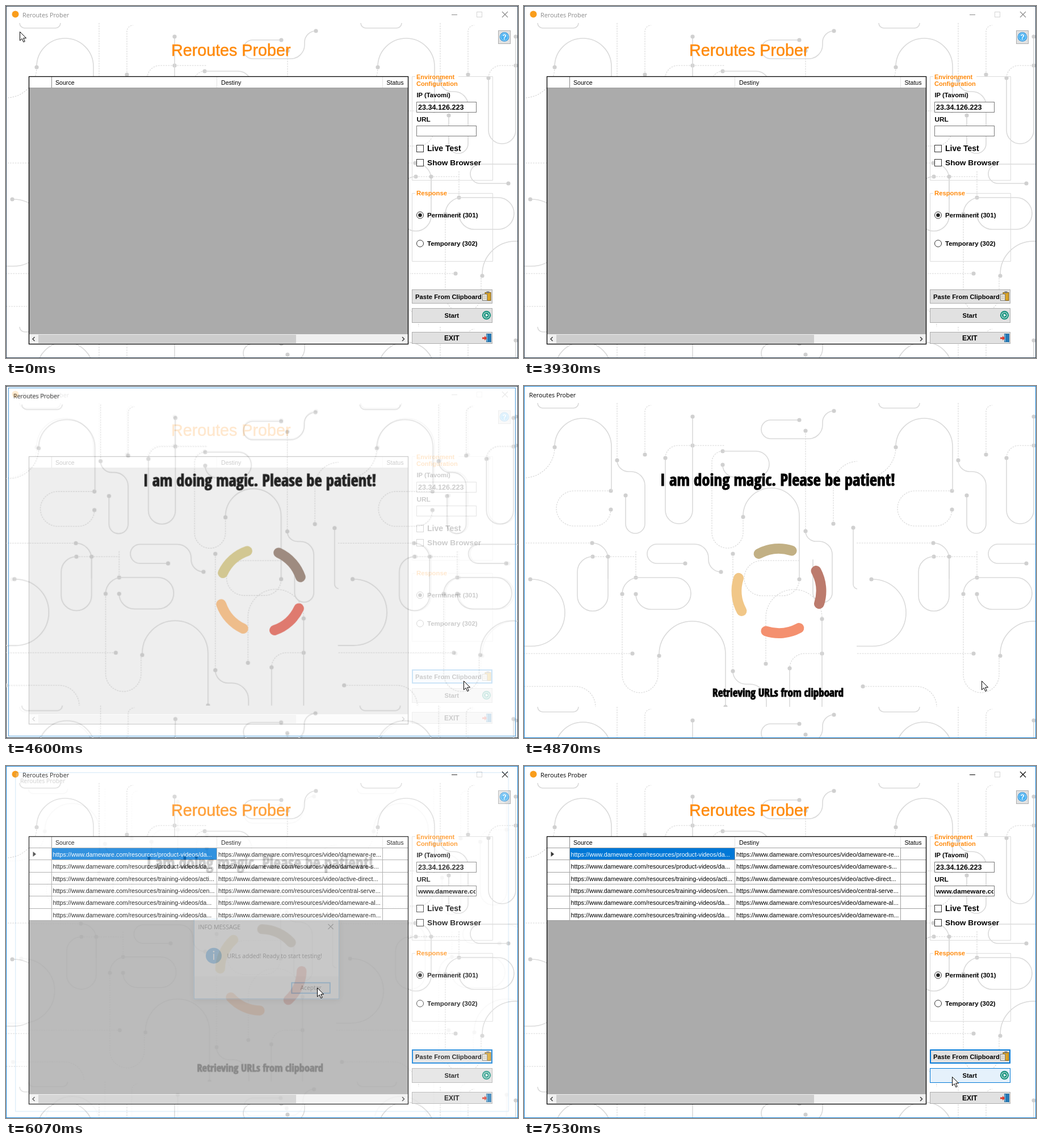
Animation, 902 px wide and 621 px high, one loop 8 s. Source, as an HTML page:

```html
<!DOCTYPE html>
<html lang="en">
<head>
<meta charset="utf-8">
<title>Reroutes Prober</title>
<style>
  html, body { margin: 0; width: 100%; height: 100%; overflow: hidden; background: #fff; }
  svg { display: block; }
  text { font-family: "Liberation Sans", Arial, sans-serif; white-space: pre; }
  .seg { font-family: "Open Sans", "Noto Sans", sans-serif; }
  .b { font-weight: bold; }
  .accent { fill: #ff8a0c; }
  .solid { fill: none; stroke: #dadada; stroke-width: 1.6; }
  .dash { fill: none; stroke: #d6d6d6; stroke-width: 1.1; stroke-dasharray: 2.6 1.8; }
  .dot { fill: #d0d0d0; }
  .loud { font-weight: 900; font-stretch: extra-condensed; stroke: #000; stroke-width: 1; text-anchor: middle; }
</style>
</head>
<body>
<svg id="stage" width="902" height="621" viewBox="0 0 902 621" xmlns="http://www.w3.org/2000/svg"></svg>
<script>
const W = 902, H = 621, LOOP = 8000, FRAME = 1000 / 15;
const NAME = 'Reroutes Prober';
const BLUE = '#0078d7', EDGE = '#1883d7', DARK = '#2f4254';

// ---------- markup helpers ----------
const text = (x, y, s, size, cls = '', extra = '') =>
  `<text x="${x}" y="${y}" font-size="${size}" class="${cls}" ${extra}>${s}</text>`;
const box = (x, y, w, h, fill = 'none', stroke = 'none', extra = '') =>
  `<rect x="${x}" y="${y}" width="${w}" height="${h}" fill="${fill}" stroke="${stroke}" ${extra}/>`;
const line = (d, stroke = '#000', width = 1) =>
  `<path d="${d}" fill="none" stroke="${stroke}" stroke-width="${width}"/>`;
const disc = (x, y, r, fill, extra = '') => `<circle cx="${x}" cy="${y}" r="${r}" fill="${fill}" ${extra}/>`;

// ---------- circuit wallpaper ----------
// A trace runs along the axes, turns as wide as its legs allow, and has a dot at each end marked "o".
function trace(spec, cls) {
  const pts = [spec.match(/-?\d+,\d+/)[0].split(',').map(Number)];
  for (const [, axis, v] of spec.matchAll(/([HV])(-?\d+)/g)) {
    const [x, y] = pts[pts.length - 1];
    pts.push(axis === 'H' ? [+v, y] : [x, +v]);
  }
  const last = pts.length - 1;
  const leg = i => Math.hypot(pts[i + 1][0] - pts[i][0], pts[i + 1][1] - pts[i][1]);
  const room = i => leg(i) / (i === 0 || i === last - 1 ? 1 : 2);
  const toward = (p, q, r) => {
    const k = r / Math.hypot(q[0] - p[0], q[1] - p[1]);
    return [p[0] + (q[0] - p[0]) * k, p[1] + (q[1] - p[1]) * k];
  };
  let d = 'M' + pts[0];
  for (let i = 1; i < last; i++) {
    const [a, b, c] = pts.slice(i - 1, i + 2), r = Math.min(room(i - 1), room(i));
    const cross = (b[0] - a[0]) * (c[1] - b[1]) - (b[1] - a[1]) * (c[0] - b[0]);
    d += `L${toward(b, a, r)}A${r} ${r} 0 0 ${cross > 0 ? 1 : 0} ${toward(b, c, r)}`;
  }
  const dot = p => `<circle class="dot" cx="${p[0]}" cy="${p[1]}" r="3.600"/>`;
  return `<path class="${cls}" d="${d}L${pts[last]}"/>` +
    (spec.startsWith('o') ? dot(pts[0]) : '') + (spec.endsWith('o') ? dot(pts[last]) : '');
}
const traces = (list, cls) => list.trim().split(/\s*\n\s*/).map(s => trace(s, cls)).join('');

const dashed = traces(`
  164,30 V131
  o213,121 V34 H224
  o297,105 H249 V127
  297,105 H354
  54,108 V162 H-15
  o153,185 H57 V247 H153 V218 o
  o350,115 H331 V286 H386 V231
  o496,79 V256
  o545,243 V133 H588
  485,308 H388 V370 H485 V341
  -15,277 H120
  o121,301 H197
  o197,338 V290
  173,367 V541 H236 V476
  o191,472 H-15
  o368,296 V503
  o426,490 V359 H525 V411
  o525,472 H468 V498
  o-4,530 H126 V566`, 'dash');
const solid = traces(`
  24,30 V39 H96 V30
  o164,131 V151 H213 V260 H179 V193 o
  o297,54 V243 H249 V127 o
  o54,108 V57 H154 V185
  o485,60 H418 V93 H526 V44 H546 o
  350,115 H432 V161 H350 V139 o
  o386,231 V180 H485 V341 o
  o496,256 V274 H543 V382 H509 V306
  o120,277 H148 V397 H94 V301 H121
  o148,301 V340
  o173,367 V338 H294 V394 H197 V367 o
  o11,341 H72 V459 H-30
  o284,313 H217 V279 H325 V328 H347 o
  o238,476 V415 H355 V566 o
  o368,503 V526 H427 V566
  o468,498 V566
  o525,411 V566
  o580,250 V358 H588`, 'solid');

const tileW = 601, tileH = 536;
const defs = `<defs>
  <clipPath id="tileClip">${box(-15, 30, tileW + 1, tileH)}</clipPath>
  <g id="tile" clip-path="url(#tileClip)">${dashed}${solid}</g>
  <g id="paper">${box(0, 0, W, H, '#fff')}${[0, 1, 2, 3].map(i =>
    `<use href="#tile" x="${i % 2 * tileW}" y="${(i >> 1) * tileH}"/>`).join('')}</g>
  <filter id="shadow" x="-20%" y="-20%" width="140%" height="150%">
    <feDropShadow dx="0" dy="2" stdDeviation="5" flood-color="#000" flood-opacity=".32"/>
  </filter>
</defs>`;

// ---------- main window ----------
const site = 'https://www.dameware.com/resources/';
const rows = [
  ['product-videos/da', 'dameware-re'], ['product-videos/da', 'dameware-s'],
  ['training-videos/acti', 'active-direct'], ['training-videos/cen', 'central-serve'],
  ['training-videos/da', 'dameware-al'], ['training-videos/da', 'dameware-m']
];
const rowY = i => 144.5 + Math.round(i * 64 / 3);
const tableRows = box(41, 145, 667, 128, '#fff') + box(81, 145, 290, 20.5, BLUE) +
  '<path d="M47.500 151V160L53 155.500Z" fill="#333"/>' +
  rows.map(([from, to], i) =>
    line(`M41 ${rowY(i + 1)}H708`, '#a0a0a0') +
    text(82.5, rowY(i) + 15, `${site}${from}...`, 10.8, '', i ? '' : 'fill="#fff"') +
    text(374, rowY(i) + 15, `${site}video/${to}...`, 10.8)).join('') +
  line('M80.500 145V272M371.500 145V272M663.500 145V272', '#a0a0a0');

const grid = box(40, 124, 669, 473, '#ababab') +
  box(41, 125, 667, 19, '#fff') + line('M41 144.500H708', '#a0a0a0') +
  line('M80.500 125V144', '#888') + line('M371.500 125V144M663.500 125V144', '#e2e2e2') +
  text(87, 139, 'Source', 10.6) + text(379, 139, 'Destiny', 10.6) + text(670.5, 139, 'Status', 10.6) +
  `<g id="rows">${tableRows}</g>` +
  box(41, 579, 667, 17, '#f0f0f0') + box(57, 580, 454, 15, '#cdcdcd') +
  line('M50.500 584L47 587.500L50.500 591M698 584L701.500 587.500L698 591', '#404040', 1.5) +
  box(40.5, 124.5, 668, 472, 'none', '#000', 'stroke-width="1.3"');

const buttons = [
  { id: 'paste', y: 500, h: 25, x: 721, label: 'Paste From Clipboard', size: 11.25 },
  { id: 'start', y: 533, h: 26, x: 772.5, label: 'Start', size: 11.2 },
  { id: 'exit', y: 575, h: 21, x: 772, label: 'EXIT', size: 12 }
];
const buttonArt = buttons.map(b =>
  box(715, b.y, 142, b.h, '#adadad', 'none', `id="${b.id}"`) + box(716, b.y + 1, 140, b.h - 2, '#e1e1e1') +
  text(b.x, b.y + b.h / 2 + 4, b.label, b.size, 'b')).join('');

const icons =
  // clipboard
  box(844, 505.5, 10, 14, '#d9a326', '#7d5a10') + box(846.5, 503.5, 5, 3, '#777') +
  box(839.5, 508.5, 8, 11, '#f7f3e4', '#777') + line('M841 511.500H846M841 514H846M841 516.500H846', '#999', .8) +
  // start
  disc(846.5, 545.5, 7.7, '#16907c') + disc(846.5, 545.5, 5, 'none', 'stroke="#d5f0ea" stroke-width="1.1"') +
  '<path d="M845 542.700V548.300L849.500 545.500Z" fill="#fff"/>' +
  // exit
  box(846.5, 578.5, 8, 14, '#9fd0ef', '#2b6d9c') + '<path d="M848 579L854.500 578V593.500L848 591.500Z" fill="#2479b5"/>' +
  '<path d="M839 584.500H843V582L847.500 586L843 590V587.500H839Z" fill="#dc3a2c"/>' +
  // help
  box(867.5, 43.5, 21, 23, '#e1e1e1', '#adadad') + disc(878, 54.5, 8.3, '#1f8fdc') +
  disc(878, 54.5, 6.6, '#48b2f2', 'stroke="#d4efff" stroke-width=".8"') +
  text(878, 59, '?', 12.5, 'b', 'fill="#fff" text-anchor="middle"');

const frameBox = (top, bottom, gap) => line(`M${gap} ${top}H857.500V${bottom}H715.500V${top}H721`, '#dcdcdc');
const field = y => box(723.5, y, 105, 18, '#fff', '#7a7a7a');
const check = (y, label, size) => box(723.5, y, 12, 12, '#fff', '#333') + text(742, y + 10.5, label, size, 'b');
const radio = (y, label) => disc(729.5, y, 6, '#fff', 'stroke="#333"') + text(742, y + 4, label, 11.5, 'b');

const panel = frameBox(124.5, 307.5, 797) + frameBox(330.5, 450.5, 779) +
  text(723, 129, 'Environment', 11, 'b accent') + text(723, 141, 'Configuration', 11.1, 'b accent') +
  text(723, 334, 'Response', 11.3, 'b accent') +
  text(723.5, 160.5, 'IP (Tavomi)', 11.2, 'b') + text(723.5, 204, 'URL', 11.8, 'b') +
  field(169.5) + text(726, 183, '23.34.126.223', 12.6, 'b') + field(211.5) +
  `<svg id="url" x="725" y="212" width="102" height="17">${text(1, 12.5, 'www.dameware.com', 11.7, 'b')}</svg>` +
  check(245.5, 'Live Test', 14) + check(270.5, 'Show Browser', 13.7) +
  radio(369, 'Permanent (301)') + radio(419, 'Temporary (302)') + disc(729.5, 369, 3.3, '#222');

const windowEdge = id => box(.5, .5, W - 1, H - 1, 'none', BLUE, `id="${id}"`);
const mainWin = `<use href="#paper"/>
  ${disc(16.5, 14.5, 6, '#f99d1c')}
  <g id="caption">${text(29, 19.5, NAME, 10.8, 'seg', 'fill="currentColor"')}
    ${line('M785 15.500H795M874 10L884 20M884 10L874 20', 'currentColor', 1.1)}</g>
  ${box(829.5, 10.5, 9, 9, 'none', '#d4d4d4')}
  ${text(291, 88, NAME, 28.7, 'accent', 'stroke="#ff8a0c" stroke-width=".5"')}
  ${grid}${panel}${buttonArt}${icons}${windowEdge('frame')}`;

// ---------- splash, dialog, pointer ----------
const splash = `<use href="#paper"/>
  ${text(9, 19.5, NAME, 10.8, 'seg', 'id="splashName"')}
  <text id="headline" class="loud" x="447" y="176">I am doing magic. Please be patient!</text>
  <text id="status" class="loud" x="447.500" y="548">Retrieving URLs from clipboard</text>
  <g id="spinner" fill="none" stroke-width="18" stroke-linecap="round">${'<path/>'.repeat(4)}</g>
  ${windowEdge('splashFrame')}`;

const dialog = box(326, 267, 266, 147, '#fff', 'none', 'filter="url(#shadow)"') +
  box(326, 372, 266, 41, '#f0f0f0') + box(326.5, 267.5, 265, 146, 'none', EDGE) +
  text(334, 286, 'INFO MESSAGE', 11, 'seg') + line('M571.500 276.500L581 286M581 276.500L571.500 286', '#111', 1.2) +
  disc(362.5, 334.5, 14.5, BLUE) + box(361.5, 331, 2, 11, '#fff') + disc(362.5, 327, 1.4, '#fff') +
  text(387, 339, 'URLs added! Ready to start testing!', 10.7, 'seg') +
  box(505, 384, 70, 19, '#e1e1e1', BLUE, 'stroke-width="2"') +
  text(540, 397.5, 'Aceptar', 10.7, 'seg', 'text-anchor="middle"');

const stage = document.getElementById('stage');
stage.innerHTML = `${defs}<g>${mainWin}</g><g id="splash">${splash}</g><g id="dialog">${dialog}</g>
  <path id="pointer" d="M.5 .5V16L4.200 12.600L6.800 18.600L9.200 17.500L6.700 11.700H11.600Z" fill="#fff" stroke="#000"/>`;
const $ = id => document.getElementById(id);
const set = (el, attrs) => { for (const k in attrs) el.setAttribute(k, attrs[k]); };
const show = (el, on) => set(el, { visibility: on ? 'visible' : 'hidden' });

// Pick the narrowest heavy face and size it to the room available.
function fit(el, room, max) {
  const faces = ['Impact', 'Roboto Condensed', 'Open Sans Condensed', 'Liberation Sans Narrow', 'Roboto', 'Open Sans', 'Noto Sans'];
  let best = Infinity, pick = '';
  for (const face of faces) {
    el.style.fontFamily = `"${face}", sans-serif`;
    el.style.fontSize = '30px';
    const len = el.getComputedTextLength();
    if (len < best) { best = len; pick = el.style.fontFamily; }
  }
  el.style.fontFamily = pick;
  el.style.fontSize = Math.min(max, 30 * room / best) + 'px';
}
fit($('headline'), 414, 31);
fit($('status'), 231, 21);

// ---------- motion ----------
const clamp = u => Math.max(0, Math.min(1, u));
const ease = u => u * u * (3 - 2 * u);
const mix = (a, b, u) => a.map((v, i) => v + (b[i] - v) * u);

const HIDE = 60, BACK = 3930, CLICK = 4330, OPEN = 4400, ASK = 5000, CLOSE = 6100;
const home = [24, 45], entry = [804, 607];
const moves = [
  { at: BACK, len: 200, to: [806, 520] },
  { at: 5070, len: 470, to: [572, 391] },
  { at: 5730, len: 270, to: [548, 391] },
  { at: 6200, len: 130, to: [552, 390] },
  { at: 6670, len: 600, to: [754, 548] }
];
const pointerAt = t => t < HIDE ? home :
  moves.reduce((p, m) => mix(p, m.to, ease(clamp((t - m.at) / m.len))), entry).map(Math.round);

// A window grows a little while it fades in and shrinks while it fades out.
function pop(el, t, open, close, cx, cy) {
  const alpha = clamp(Math.min((t - open) / 250, (close - t) / 167));
  const s = 1 - .045 * (1 - alpha);
  set(el, { opacity: alpha, transform: `translate(${cx} ${cy}) scale(${s}) translate(${-cx} ${-cy})` });
  show(el, alpha > 0);
}

// Colour belongs to the place on the ring; the arcs run through it.
const ring = [[237, 110, 97], [255, 194, 132], [221, 207, 141], [155, 132, 118]];
function spin(t) {
  const at = deg => {
    const a = deg * Math.PI / 180;
    return `${449 + 74.5 * Math.cos(a)} ${361.5 + 74.5 * Math.sin(a)}`;
  };
  [...$('spinner').children].forEach((arc, i) => {
    const turn = (.475 * Math.max(0, t - 4600) / 90 + i) % 4, k = Math.floor(turn);
    const mid = 48 + turn * 90;
    set(arc, {
      d: `M${at(mid - 23)}A74.500 74.500 0 0 1 ${at(mid + 23)}`,
      stroke: `rgb(${mix(ring[k], ring[(k + 1) % 4], turn - k).map(Math.round)})`
    });
  });
}

function paint(id, fill, edge, thick = 1) {
  const outer = $(id), y = +outer.getAttribute('y'), h = +outer.getAttribute('height');
  set(outer, { fill: edge });
  set(outer.nextElementSibling, { x: 715 + thick, y: y + thick, width: 142 - 2 * thick, height: h - 2 * thick, fill });
}

function draw(now) {
  const t = Math.floor(now / FRAME + .001) * FRAME;
  const [x, y] = pointerAt(t);
  set($('pointer'), { transform: `translate(${x} ${y})` });
  show($('pointer'), t < HIDE || t >= BACK);

  const asking = t > ASK && t < CLOSE - 167;
  const active = t > CLICK && t < OPEN - 1 || t > CLOSE - 167;
  $('caption').style.color = active ? '#000' : '#8a8a8a';
  set($('frame'), { stroke: active ? EDGE : DARK });
  set($('splashName'), { fill: asking ? '#8a8a8a' : '#000' });
  set($('splashFrame'), { stroke: asking ? DARK : EDGE });

  for (const b of buttons) {
    const hover = t >= BACK && x >= 715 && x < 857 && y >= b.y && y < b.y + b.h;
    const focus = b.id === 'paste' && t > CLICK;
    paint(b.id, hover ? '#e5f1fb' : '#e1e1e1', hover || focus ? BLUE : '#adadad', focus ? 2 : 1);
  }

  show($('rows'), t > ASK);
  show($('url'), t > ASK);
  set($('status'), { opacity: t > 4700 ? 1 : 0 });
  pop($('splash'), t, OPEN, CLOSE, W / 2, H / 2);
  pop($('dialog'), t, ASK, CLOSE, 458.5, 340);
  spin(t);
}

const begin = performance.now();
function tick() {
  draw((performance.now() - begin) % LOOP);
  requestAnimationFrame(tick);
}
tick();
</script>
</body>
</html>
```
